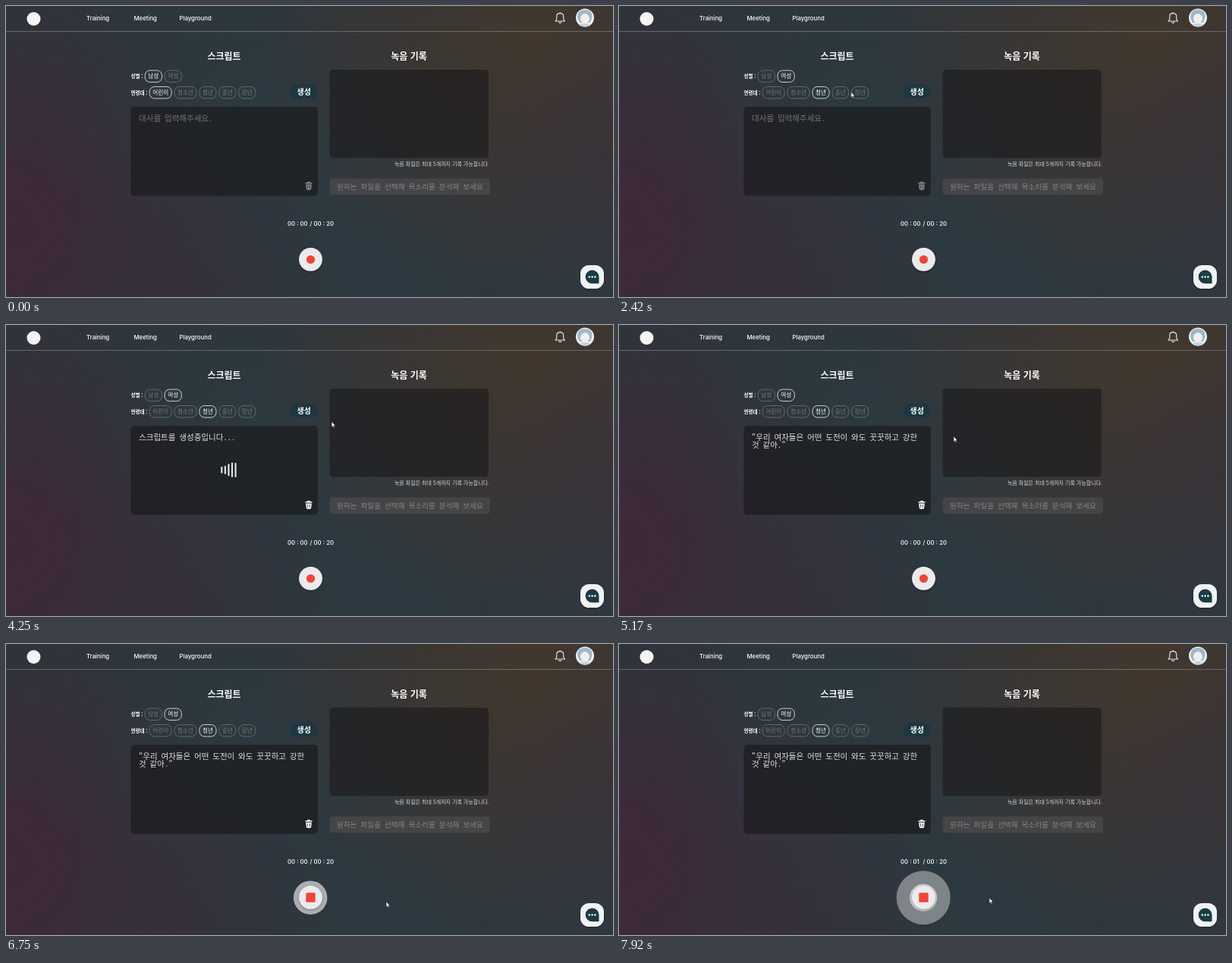
Recreate the animation shown at these times as an HTML page. Size 800 by 384 pixels, loop 8 s.

```html
<!DOCTYPE html>
<html lang="ko">
<head>
<meta charset="utf-8">
<title>Voice script recorder</title>
<style>
  html, body { margin: 0; width: 100%; height: 100%; overflow: hidden; background: #2e3339; }
  svg { display: block; width: 100%; height: 100%; }
  text { font-family: "Noto Sans CJK KR", "Noto Sans CJK", sans-serif; fill: #fff; }
  .latin { font: 500 7.8px Inter, Roboto, sans-serif; }
  .title { font-size: 12px; font-weight: 700; text-anchor: middle; }
  .label { font-size: 6.5px; font-weight: 700; }
  .pill rect { fill: none; stroke-width: .9; }
  .pill text { font-size: 7.6px; text-anchor: middle; }
  .mono {
    font-family: "Noto Sans Mono CJK KR", "Noto Sans CJK KR", monospace;
    font-size: 10.54px; font-weight: 300; word-spacing: -.45px; white-space: pre;
  }
</style>
</head>
<body>
<svg viewBox="0 0 800 384" xmlns="http://www.w3.org/2000/svg">
  <defs id="defs">
    <filter id="shadow" x="-30%" y="-30%" width="160%" height="160%">
      <feDropShadow dx="0" dy="1" stdDeviation="1.6" flood-color="#000" flood-opacity=".35"/>
    </filter>
  </defs>
  <g id="back"></g>

  <!-- header -->
  <path d="M0 33.500H800" stroke="#66666b" stroke-width="1"/>
  <circle cx="36.500" cy="17" r="9" fill="#f4f4f4"/>
  <text class="latin" x="106" y="18.500">Training</text>
  <text class="latin" x="168.500" y="18.500">Meeting</text>
  <text class="latin" x="228.500" y="18.500">Playground</text>
  <path fill="none" stroke="#eee" stroke-width="1.100" stroke-linejoin="round" stroke-linecap="round"
    d="M724 20H736.500L734.700 17.500V13.500C734.700 10.800 732.800 9.600 730.200 9.600S725.800 10.800 725.800 13.500V17.500ZM730.200 9.500V8.500M728.700 21.500Q730.200 23.500 731.800 21.500"/>
  <clipPath id="face"><circle cx="763" cy="15.500" r="12"/></clipPath>
  <g clip-path="url(#face)">
    <rect x="751" y="3" width="25" height="25" fill="#eef3f5"/>
    <path d="M753.500 17C752 8 757 5 763 5S774 8 772 17L770 22H756Z" fill="#9db9c9"/>
    <ellipse cx="763" cy="16.500" rx="6" ry="6.500" fill="#f3eeeb"/>
    <path d="M754 29Q755 23 763 23T772 29Z" fill="#c3d3dc"/>
  </g>

  <!-- script side -->
  <text class="title" x="287.500" y="71">스크립트</text>
  <text class="label" x="164.500" y="95">성별 :</text>
  <text class="label" x="164.500" y="116.500">연령대 :</text>
  <g id="pills"></g>
  <rect x="374.500" y="103.500" width="36.500" height="19" rx="9.500" fill="#1c3741"/>
  <text x="392.700" y="116.800" font-size="10" font-weight="700" text-anchor="middle">생성</text>
  <rect x="164.500" y="133" width="246.500" height="117.500" rx="4.500" fill="#141416" opacity=".54"/>
  <text class="mono" id="line1" x="175" y="151.700"></text>
  <text class="mono" id="line2" x="175" y="162.200"></text>
  <g id="loader" fill="#e8e8e8"></g>
  <g id="trash" transform="translate(0 .4)">
    <path d="M394.500 232.500H397L397.700 231.300H400.300L401 232.500H403.500V234H394.500ZM395.200 235H402.800L402.200 241.200Q402.100 242.300 401 242.300H397Q395.900 242.300 395.800 241.200Z"/>
    <path d="M397.600 236.500V240.700M400.400 236.500V240.700" stroke="#26262b" stroke-width=".8"/>
  </g>

  <!-- records side -->
  <text class="title" x="531" y="71">녹음 기록</text>
  <rect x="426.500" y="84" width="209.500" height="116.500" rx="4.500" fill="#18171a" opacity=".56"/>
  <text x="637" y="211.200" font-size="7" text-anchor="end" style="fill:#d5d5d6">녹음 파일은 최대 5개까지 기록 가능합니다.</text>
  <rect x="426.500" y="227.500" width="211.500" height="21.500" rx="4" fill="#454446"/>
  <text class="mono" x="436" y="241.500" style="font-size:9.66px;word-spacing:0;fill:#858486">원하는 파일을 선택해 목소리를 분석해 보세요</text>

  <!-- recorder -->
  <text class="latin" id="clock" x="371" y="290"></text>
  <text class="latin" x="432" y="290" text-anchor="end">/ 00 : 20</text>
  <g id="rings" fill="#ebebeb"></g>
  <circle cx="401.500" cy="334.300" r="15.400" fill="#ebebed" filter="url(#shadow)"/>
  <circle id="dot" cx="401.500" cy="334.500" r="5.600" fill="#f44336"/>
  <rect id="stop" x="395.300" y="328.300" width="12.400" height="12.400" rx="1.500" fill="#f44336"/>

  <!-- chat -->
  <rect x="757" y="342" width="31" height="31" rx="11.500" fill="#f1f2f3" filter="url(#shadow)"/>
  <path d="M781.500 366.300V357.500A8.900 8.900 0 1 0 772.600 366.300Z" fill="#1b3c45"/>
  <g fill="#fff">
    <circle cx="768.800" cy="357.500" r="1.200"/><circle cx="772.600" cy="357.500" r="1.200"/><circle cx="776.400" cy="357.500" r="1.200"/>
  </g>

  <g id="cursor" stroke="#222" stroke-width=".6" stroke-linejoin="round" fill="#fff">
    <path id="arrow" d="M0 0V7.200L1.700 5.700L2.800 8.200L4 7.700L2.900 5.200H5.200Z"/>
    <path id="hand" d="M-.8 .7Q0 -.6 .8 .7V3.700Q1.700 3 2.300 4Q3.200 3.300 3.700 4.300Q4.800 3.900 4.900 5.200V7.500L4 10.300H0L-2.700 6.500Q-2.800 5.200 -1.600 5.600L-.8 6.300Z"/>
  </g>
</svg>
<script>
const NS = "http://www.w3.org/2000/svg";
const LOOP = 8000;
const $ = id => document.getElementById(id);

function add(parent, tag, attrs, text) {
  const el = document.createElementNS(NS, tag);
  for (const k in attrs) el.setAttribute(k, attrs[k]);
  if (text) el.textContent = text;
  parent.appendChild(el);
  return el;
}
const show = (el, on) => el.setAttribute("visibility", on ? "visible" : "hidden");

// soft background: [x, y, radius, colour, opacity]
add($("back"), "rect", { width: 800, height: 384, fill: "#2f343a" });
[
  [60, 50, 300, "#2d363b", 0.8],
  [0, 290, 320, "#41273a", 0.9],
  [330, 120, 260, "#2b3b42", 0.7],
  [500, 340, 260, "#2b3b43", 0.75],
  [250, 340, 170, "#36303e", 0.6],
  [700, 40, 360, "#44382c", 0.9],
  [790, 200, 180, "#39313a", 0.65],
  [760, 350, 170, "#303a42", 0.6]
].forEach(([cx, cy, r, color, alpha], i) => {
  const g = add($("defs"), "radialGradient", { id: "glow" + i, gradientUnits: "userSpaceOnUse", cx, cy, r });
  add(g, "stop", { offset: 0, "stop-color": color, "stop-opacity": alpha });
  add(g, "stop", { offset: 0.5, "stop-color": color, "stop-opacity": alpha * 0.55 });
  add(g, "stop", { offset: 1, "stop-color": color, "stop-opacity": 0 });
  add($("back"), "rect", { width: 800, height: 384, fill: `url(#glow${i})` });
});

function pill(name, x, y, w) {
  const g = add($("pills"), "g", { class: "pill" });
  const box = add(g, "rect", { x, y, width: w, height: 15.5, rx: 6.5 });
  const label = add(g, "text", { x: x + w / 2, y: y + 10.3 }, name);
  return on => {
    box.setAttribute("stroke", on ? "#dedede" : "#6b6d72");
    label.style.fill = on ? "#fff" : "#77787d";
  };
}
const male = pill("남성", 183.2, 85, 22.3);
const female = pill("여성", 209, 85, 22.3);
const child = pill("어린이", 189.2, 106.5, 29);
pill("청소년", 222, 106.5, 29)(false);
const young = pill("청년", 255, 106.5, 22);
pill("중년", 281, 106.5, 21.7)(false);
pill("장년", 306.7, 106.5, 22)(false);

const bars = [0, 1, 2, 3, 4].map(i => add($("loader"), "rect", { x: 283.3 + i * 4.55, width: 2.1, rx: 1 }));
const rings = [6150, 7700].map(start => ({ start, el: add($("rings"), "circle", { cx: 401.2, cy: 334.7 }) }));

// pointer tip: [time, x, y]
const path = [
  [1080, 345, 46], [1480, 226, 93], [1780, 226, 93], [2080, 264, 112], [2250, 264, 112],
  [2720, 403, 117], [3620, 403, 117], [4330, 430, 128], [4950, 441, 147], [5200, 441, 147],
  [5570, 402, 334], [5820, 402, 334], [5920, 446, 340], [6080, 555, 346], [6250, 555, 346],
  [6750, 501, 340], [7600, 488, 335], [8000, 488, 335]
];
const hovers = [[1400, 2330], [2620, 2870], [5530, 5850]];

const clamp = v => Math.max(0, Math.min(1, v));
const smooth = v => v * v * (3 - 2 * v);

function pointAt(t) {
  const i = Math.max(1, path.findIndex(p => p[0] > t));
  const [t0, x0, y0] = path[i - 1], [t1, x1, y1] = path[i];
  const k = smooth(clamp((t - t0) / (t1 - t0)));
  return [x0 + (x1 - x0) * k, y0 + (y1 - y0) * k];
}

function barScale(ms) {
  if (ms < 0) return 1;
  const p = ms / 1000 % 1;
  const k = 1 - Math.pow(1 - p * 2 % 1, 3.4);
  return p < 0.5 ? 1 - 0.6 * k : 0.4 + 0.6 * k;
}

function render(t) {
  const isFemale = t >= 1700, isYoung = t >= 2170;
  const busy = t >= 2870 && t < 4700, done = t >= 4700;
  male(!isFemale);
  female(isFemale);
  child(!isYoung);
  young(isYoung);

  $("line1").textContent = done ? '"우리 여자들은 어떤 도전이 와도 꿋꿋하고 강한'
    : busy ? "스크립트를 생성중입니다..." : "대사를 입력해주세요.";
  $("line2").textContent = done ? '것 같아."' : "";
  $("line1").style.fill = $("line2").style.fill = busy || done ? "#e2e2e2" : "#737378";
  $("trash").setAttribute("fill", busy || done ? "#fff" : "#87878b");

  show($("loader"), busy);
  bars.forEach((bar, i) => {
    const h = 19.5 * barScale(t - 3000 - i * 100);
    bar.setAttribute("y", 191.3 - h / 2);
    bar.setAttribute("height", h);
  });

  const recording = t >= 5830;
  show($("dot"), !recording);
  show($("stop"), recording);
  $("clock").textContent = t >= 7150 ? "00 : 01" : "00 : 00";
  rings.forEach(({ start, el }) => {
    const age = (t - start) / 1000;
    show(el, age > 0);
    el.setAttribute("r", 15.5 + 11.3 * Math.max(0, age));
    el.setAttribute("opacity", clamp(0.78 - 0.2 * age));
  });

  const [x, y] = pointAt(t);
  const hover = hovers.some(([a, b]) => t >= a && t < b);
  const seen = t >= 1080;
  $("cursor").setAttribute("transform", `translate(${x.toFixed(2)} ${y.toFixed(2)})`);
  show($("arrow"), seen && !hover);
  show($("hand"), seen && hover);
}

const begin = performance.now();
function tick() {
  render((performance.now() - begin) % LOOP);
  requestAnimationFrame(tick);
}
render(0);
requestAnimationFrame(tick);
</script>
</body>
</html>
```
